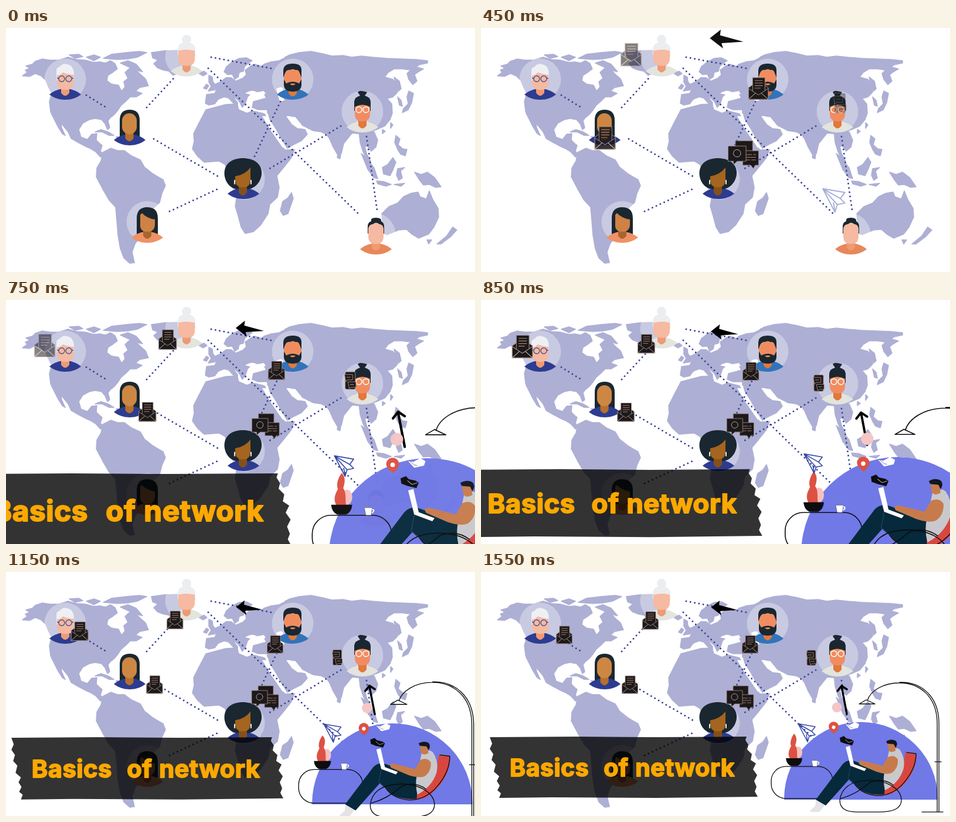
An HTML page that plays this animation: 800 by 418 pixels, repeating every 4600 ms.

```html
<!DOCTYPE html>
<html lang="en">
<head>
<meta charset="utf-8">
<title>Basics of network</title>
<style>
  html, body { margin: 0; width: 100%; height: 100%; overflow: hidden; background: #fff; }
  svg { display: block; width: 100vw; height: 100vh; }
  .land { fill: #adafd4; stroke: #adafd4; stroke-width: 1.5; stroke-linejoin: round; }
  .sea { fill: #fff; }
  .dots { fill: none; stroke: #3a4296; stroke-width: 3; stroke-linecap: round; stroke-dasharray: 0 7.4; }
  .glow { fill: #fff; opacity: .33; }
  .hair { fill: #1a2730; }
  .line { fill: none; stroke: #0b0b0b; stroke-width: 1.3; stroke-linecap: round; stroke-linejoin: round; }
  .card { fill: #1d191a; stroke: #a58f86; stroke-width: .8; stroke-linejoin: round; }
  .trim { fill: none; stroke: #cfc0b9; stroke-width: .8; stroke-linejoin: round; }
  .note { fill: none; stroke: #a98672; stroke-width: .9; }
  .title { font: 700 41px Inter, "Open Sans", sans-serif; letter-spacing: .5px; fill: #fca800; stroke: #fca800; stroke-width: 1.8; stroke-linejoin: round; }
  [data-start] { opacity: 0; }
</style>
</head>
<body>
<svg viewBox="0 0 800 418" preserveAspectRatio="none">
  <defs>
    <path id="bust" d="M-27 1C-19-6-10-9 0-9S19-6 27 1C19 7 10 10 0 10S-19 7-27 1Z"/>
    <path id="neck" d="M-7-16H7V-3Q0 7-7-3Z"/>
    <circle id="glow" class="glow" r="35.5"/>
    <g id="mail">
      <path class="card" d="M-13.500-1L-8-5H8L13.500-1V15H-13.500Z"/>
      <path class="card" d="M-8-15H9V6L0 10-8 5Z"/>
      <path class="note" d="M-5-11H6M-5-7.5H6M-5-4H6M-5-.5H3"/>
      <path class="card" d="M-13.500 0L0 9 13.500 0V15H-13.500Z"/>
      <path class="trim" d="M-13.500 15L-4 6.500M13.500 15L4 6.500"/>
    </g>
  </defs>

  <g class="land">
    <!-- North and Central America -->
    <path d="M28 82L36 76 33 72 41 69 34 65 45 62 50 57 62 53 75 55 90 55 106 50 120 54 135 55 150 59 160 58 170 60 178 56 186 61 190 70 182 76 174 81 172 90 180 96 192 98 197 108 203 101 201 92 208 86 203 76 212 68 222 72 230 80 238 87 243 99 228 102 221 108 232 112 222 118 212 118 204 126 196 133 190 142 184 149 179 153 160 152 130 158 84 158 76 143 74 126 78 112 72 100 68 90 60 82 50 78 40 83Z"/>
    <path d="M77 146L179 152 174 159 177 171 173 174 169 164 163 157 152 155 142 157 131 163 124 174 128 187 139 191 146 182 155 181 154 192 160 198 164 201 161 211 168 218 161 221 153 212 145 207 136 203 123 196 111 189 106 178 98 168 94 163 95 171 101 184 96 181 88 168Z"/>
    <path d="M108 46L124 45 131 49 118 52ZM137 50L150 46 161 50 150 56ZM166 52L180 45 205 42 228 40 240 42 224 50 208 53 190 54ZM195 60L208 56 222 62 233 75 220 72 208 66ZM152 178L162 174 174 178 184 184 176 184 164 178ZM188 186L200 188 192 191Z"/>
    <path d="M248 42L270 39 300 38 318 39 322 47 318 60 312 70 300 74 285 81 278 74 268 72 258 68 252 61 259 55 250 51Z"/>
    <!-- South America -->
    <path d="M165 213L179 206 190 210 202 210 214 219 229 226 236 238 251 250 268 260 272 270 266 283 262 299 250 310 246 324 236 341 228 349 227 360 220 370 215 384 219 402 211 403 201 394 195 378 191 355 189 330 187 307 176 295 165 276 154 255 155 240 162 228Z"/>
    <!-- Africa -->
    <path d="M341 140L356 136 375 131 394 130 397 140 411 146 421 142 441 147 449 162 459 185 470 202 476 209 492 208 487 222 472 241 462 253 466 273 463 290 450 302 447 318 434 338 422 349 408 352 401 341 396 322 391 305 394 287 386 273 377 263 378 248 374 234 364 228 350 229 338 230 327 220 318 207 321 194 320 181 329 163Z"/>
    <path d="M487 282L490 292 481 318 473 321 468 313 472 297 481 291Z"/>
    <!-- Europe -->
    <path d="M372 75L376 66 386 58 398 52 410 51 420 56 414 60 407 66 405 74 398 76 396 84 390 88 386 79 378 80Z"/>
    <path d="M340 129L342 114 356 112 360 104 354 98 366 92 375 85 384 85 392 91 404 86 410 80 408 72 416 66 424 62 434 65 428 72 440 62 452 58 466 56 478 50 500 44 500 130 446 140 430 140 420 136 422 126 430 124 444 120 440 112 428 114 420 110 412 118 408 130 403 136 398 126 392 120 386 116 395 128 395 133 387 128 380 120 372 118 362 122 356 130 346 132Z"/>
    <path d="M346 81L352 84 353 92 360 101 357 106 345 108 350 100 346 93ZM342 96L346 99 342 105 337 103ZM328 77L338 74 343 78 336 82Z"/>
    <!-- Asia -->
    <path d="M470 56L472 59 476 50 484 46 500 42 520 40 540 44 556 48 575 47 590 50 606 48 625 50 650 52 675 53 700 54 719 56 719 60 705 63 700 67 712 70 702 76 697 80 701 91 694 97 687 88 684 78 690 72 676 70 662 70 652 76 646 84 660 88 668 98 668 110 660 118 650 121 658 130 659 146 655 157 646 168 632 174 610 182 592 180 550 184 538 178 524 176 506 167 494 152 446 146 446 110Z"/>
    <path d="M602 176L628 178 634 192 631 204 623 211 617 203 612 202 615 215 622 228 616 226 609 212 604 196ZM544 178L592 178 584 188 576 198 572 215 566 218 558 204 552 190ZM566 215L571 216 570 224 565 222Z"/>
    <path d="M446 141L478 146 486 160 498 172 510 174 514 182 504 193 488 201 480 206 470 190 460 172 450 156Z"/>
    <path d="M662 84L671 91 674 104 670 108 665 96ZM687 108L695 112 692 128 686 140 676 145 678 138 686 130 684 118ZM668 118L674 124 676 134 671 132ZM656 162L660 166 656 172ZM642 174L647 177 642 181Z"/>
    <!-- Southern islands -->
    <path d="M606 215L615 222 628 240 634 258 627 256 617 242ZM632 262L644 263 657 268 648 271 634 267ZM660 222L665 230 660 243 655 253 644 250 642 239 651 234ZM668 241L680 239 673 245 676 257 670 261 666 252ZM665 184L672 190 669 200 677 207 684 208 681 219 673 216 668 208 663 196ZM697 247L708 251 719 247 731 256 742 272 733 273 722 268 712 269 705 260ZM662 268L680 266 674 271Z"/>
    <path d="M641 318L653 306 668 300 678 289 691 283 703 281 706 289 717 293 722 279 728 294 737 309 738 324 730 341 721 353 704 360 692 353 683 345 670 346 650 354 637 349 642 335ZM718 363L726 363 721 370ZM762 341L769 346 758 358 742 370 735 370 752 356Z"/>
  </g>
  <g class="sea">
    <path d="M408 112Q420 104 428 110L440 108 443 113 426 116ZM461 104Q470 99 473 104L470 111 475 124 467 126 464 116ZM437 151L444 151 456 172 476 204 472 205 452 176ZM478 151L484 151 498 164 511 172 498 172 488 165Z"/>
  </g>

  <g class="dots">
    <path d="M137 115L174 138M240 136L287 85M350 50L452 69M345 69L600 317M468 126L424 220M571 168L446 243M615 186L633 312M252 190L363 255M279 314L365 274"/>
  </g>

  <!-- People -->
  <g>
    <use href="#glow" x="101" y="88"/>
    <use href="#bust" x="101" y="113" fill="#2d3b90"/>
    <use href="#neck" x="101" y="114" fill="#ee9b74"/>
    <path fill="#eff0f4" d="M86 90V76Q85 68 92 66Q96 60 104 62Q113 64 114 70Q117 74 115 90Z"/>
    <path fill="#f6b9a1" d="M87 81Q93 81 97 76Q107 80 115 80V93Q115 106 101 106T87 93Z"/>
    <path fill="none" stroke="#3c518f" stroke-width="1.3" d="M90 87a5 5 0 1 0 10 0a5 5 0 1 0-10 0M102 87a5 5 0 1 0 10 0a5 5 0 1 0-10 0M87 86h3M112 86h3"/>
  </g>
  <g>
    <path class="hair" d="M194 187V158Q194 140 211 140T228 158V187Z"/>
    <use href="#bust" x="211" y="191" fill="#2d3b90"/>
    <use href="#neck" x="210.500" y="192" fill="#b4702d"/>
    <rect x="198" y="146" width="25" height="36" rx="12.500" fill="#cd8744"/>
  </g>
  <g>
    <use href="#glow" x="307" y="49"/>
    <use href="#bust" x="308" y="73" fill="#e3e4de"/>
    <use href="#neck" x="308" y="74" fill="#ee9b74"/>
    <path fill="#ecedf0" d="M293 46V36Q294 27 302 25A8 8 0 1 1 314 25Q323 28 323 37V46Z"/>
    <path fill="#f6b9a1" d="M294 39Q308 35 322 39V53Q322 65 308 65T294 53Z"/>
  </g>
  <g>
    <use href="#glow" x="489" y="88"/>
    <use href="#bust" x="489" y="113" fill="#3273ba"/>
    <use href="#neck" x="489" y="115" fill="#e2783c"/>
    <rect x="474" y="66" width="30" height="38" rx="11" fill="#f08d60"/>
    <path class="hair" d="M473 85V72Q474 61 489 61T504 72V85L501 77Q499 71 494 72Q489 69 484 72Q479 71 476 77Z"/>
    <path class="hair" d="M474 88L478 95Q489 89 500 95L504 88V98Q503 109 489 109T474 98Z"/>
    <path fill="#f08d60" d="M484 96Q489 94 494 96Q489 100 484 96Z"/>
  </g>
  <g>
    <use href="#glow" x="608" y="143"/>
    <use href="#bust" x="608" y="169" fill="#e3e4de"/>
    <use href="#neck" x="608" y="170" fill="#e2783c"/>
    <path class="hair" d="M594 142V126Q595 118 604 116L600 110Q602 107 608 108T616 110L612 116Q621 118 622 126V142Z"/>
    <path fill="#f08d60" d="M595 135Q608 128 621 135V147Q621 160 608 160T595 147Z"/>
    <path fill="none" stroke="#fff" stroke-width="1.4" d="M597 140a5 5 0 1 0 10 0a5 5 0 1 0-10 0M609 140a5 5 0 1 0 10 0a5 5 0 1 0-10 0"/>
  </g>
  <g>
    <use href="#glow" x="406" y="259"/>
    <use href="#bust" x="405" y="283" fill="#2d3b90"/>
    <path class="hair" d="M372.500 250C372 232 386 223 404 223S437 232 436 250C435 264 424 275 414 276H393C383 275 373 264 372.500 250Z"/>
    <use href="#neck" x="404" y="285" fill="#85501a"/>
    <path fill="#a3651f" d="M391 254Q407 252 417 239V260Q417 273 404 273T391 260Z"/>
    <path stroke="#fff" stroke-width="1.8" stroke-linecap="round" d="M390 261V267M418 261V267"/>
  </g>
  <g>
    <use href="#glow" x="241" y="332"/>
    <path class="hair" d="M223 354V326Q223 307 241 307T259 326V354Z"/>
    <use href="#bust" x="241" y="358" fill="#ef9265"/>
    <use href="#neck" x="241" y="359" fill="#a9652f"/>
    <path fill="#cf8245" d="M229 320L232 317Q240 326 254 328V336Q254 349 241 349T229 336Z"/>
  </g>
  <g>
    <use href="#glow" x="629" y="353"/>
    <use href="#bust" x="631" y="378" fill="#e8875a"/>
    <use href="#neck" x="631" y="379" fill="#ee9b74"/>
    <path class="hair" d="M617 352V340Q617 333 623 331Q621 325 631 325Q641 325 640 331Q645 334 645 340V352Z"/>
    <path fill="#f6b9a1" d="M618 343Q620 336 626 336Q631 331 637 336Q643 337 644 343V357Q644 370 631 370T618 357Z"/>
  </g>

  <!-- Arriving pieces -->
  <g data-start="80">
    <path class="card" d="M430 195H456V216H430Z"/>
    <path class="card" d="M441 210H465V232H460L457 237 453 232H441Z"/>
    <path class="note" d="M446 216H455M457 216H461M446 220H461M446 224H452M454 224H461"/>
    <path class="card" d="M419 203H446V226H433L427 231V226H419Z"/>
    <circle class="trim" cx="432.500" cy="214" r="5.500"/>
  </g>
  <g data-start="190"><use href="#mail" x="459" y="124"/></g>
  <g data-start="310">
    <path d="M392.500 60.500L407 49 406 56.500 437 65 408 67 410 74Z"/>
  </g>
  <g data-start="318"><use href="#mail" x="254" y="193"/></g>
  <g data-start="367"><use href="#mail" x="289" y="83"/></g>
  <g data-start="670"><use href="#mail" x="142.500" y="108"/></g>
  <g data-start="395">
    <rect class="card" x="556" y="134" width="15" height="26" rx="2"/>
    <path class="card" d="M555 138H567V146H559L557 149ZM560 149H572V157H565L562 159Z"/>
    <path class="note" d="M558 142H564M563 153H569"/>
  </g>
  <g data-start="450">
    <path fill="#000" fill-opacity=".8" d="M15 283L160 282 300 283 453 282 451 288 456 296 454 304 462 312 460 322 469 328 464 338 471 348 466 358 470 368 467 376 472 385 300 387 120 386 31 387 34 379 28 374 32 366 27 358 31 350 22 342 25 330 18 322 21 312 15 303 19 294Z"/>
    <text class="title" x="49" y="350">Basics<tspan x="199"> of</tspan><tspan x="253"> network</tspan></text>
  </g>
  <g data-start="505">
    <path fill="none" stroke="#000" stroke-width="3.400" stroke-linecap="round" stroke-linejoin="round" d="M624 243L615 196M608 204L615 195 624 201"/>
  </g>

  <g data-start="605">
    <path fill="#7079e6" d="M517 390V388A131 131 0 0 1 779 388V390Z"/>
    <circle cx="607" cy="232" r="8.500" fill="#f5c6c6"/>
    <rect class="line" x="495" y="333" width="105" height="55" rx="25"/>
    <!-- Things on the table -->
    <ellipse cx="541" cy="309" rx="7" ry="10" fill="#f6c0bd"/>
    <path fill="#dd5142" d="M527 320C522 311 526 304 529 298C526 292 530 282 534 277C540 283 538 291 536 297C541 304 538 312 540 320Z"/>
    <path fill="#0d0d0f" d="M520 319H548Q547 329 540 332H528Q521 329 520 319Z"/>
    <path fill="none" stroke="#fff" stroke-width="1.600" d="M574 325Q579 326 574 330"/>
    <path fill="#fff" stroke="#555" stroke-width=".5" d="M564 323H574.500L573 333H566Z"/>
    <path fill="none" stroke="#888" stroke-width=".8" d="M568 320Q566 317 568 314"/>
    <!-- Messages -->
    <path fill="#dd5142" d="M602 277Q593 270 593 265A8.500 8.500 0 0 1 610 265Q610 270 602 277Z"/>
    <circle cx="601.500" cy="266" r="3" fill="#fff"/>
    <path fill="#fff" d="M622 261L629 262 638 257 645 261 643 267 630 270Z"/>
    <path fill="none" stroke="#777" stroke-width=".7" d="M623 260L630 266 634 267"/>
    <path fill="#0d0d0f" d="M612 284L619 281 623 285 632 287 636 290 633 297 621 294 613 291Z"/>
    <path fill="none" stroke="#bbb" stroke-width=".8" d="M621 287L627 292 634 290"/>
    <!-- Chair -->
    <path fill="#d8473f" d="M724 309L742 311Q744 327 734 346Q722 368 700 380Q674 386 650 376Q638 369 634 358L690 366 718 344Z"/>
    <path class="line" d="M726 309L742 311Q742 336 722 360Q702 384 674 383Q645 380 634 358"/>
    <!-- Reader -->
    <path fill="#e5e2e8" d="M572 389L588 397 582 405 577 411 561 411Q562 407 570 401Z"/>
    <path fill="#06293b" d="M690 344L640 325Q626 319 617 329L571 390 588 400 628 355 648 374Q664 383 688 381Z"/>
    <path fill="none" stroke="#24455c" d="M630 333L626 354 634 361"/>
    <path fill="#c9c9cd" d="M696 306Q706 298 714 304Q725 321 720 339Q712 362 689 374Q685 357 688 343Z"/>
    <path fill="#c77b4c" d="M694 317Q705 312 711 321Q712 336 701 344Q692 348 674 342L646 330Q642 325 648 323L662 326 685 332Z"/>
    <path fill="#c77b4c" d="M693 292H706L707 306Q699 311 695 305Z"/>
    <path fill="#101720" d="M691 290Q699 285 707 289Q712 294 707 301L704 295 693 294Z"/>
    <path fill="#fff" d="M622 300L629 298 636 329 657 337 654 341 630 332Z"/>
    <path class="line" d="M612 391C614 371 630 358 657 357C690 355 716 370 717 390C717 405 704 411 678 411H640C620 411 612 404 612 391ZM614 388Q640 381 664 360Q686 352 703 365"/>
    <!-- Lamp -->
    <path class="line" d="M778 411V260C778 213 748 190 714 190C685 190 664 204 659 220M781 411V260C781 212 750 188 714 189M752 411H788M774 325H785"/>
    <path class="line" d="M657 219L645 226H672Z"/>
  </g>
  <g data-start="385" fill="none" stroke="#3347a6" stroke-width="1.500" stroke-linejoin="round">
    <path d="M541 260L570 265 564 273 570 279 560 281 557 291ZM541 260L564 273M541 260L560 281M557 291L555 278"/>
  </g>
</svg>
<script>
  const LOOP = 4600, STEP = 50, MOVE = 1000, FADE = 150, ZOOM = 0.3;
  const parts = [...document.querySelectorAll('[data-start]')]
    .map(el => ({ el, start: +el.dataset.start }));

  const clamp = v => Math.min(1, Math.max(0, v));

  // cubic-bezier(.5, 0, .1, 1)
  function ease(x) {
    let lo = 0, hi = 1;
    for (let i = 0; i < 24; i++) {
      const u = (lo + hi) / 2, v = 1 - u;
      if (1.5 * u * v * v + 0.3 * u * u * v + u * u * u < x) lo = u; else hi = u;
    }
    return lo * lo * (3 - 2 * lo);
  }

  // Every piece shrinks toward the middle of the stage while fading in.
  function draw() {
    const t = Math.floor(performance.now() % LOOP / STEP) * STEP;
    for (const { el, start } of parts) {
      const age = t - start;
      const s = 1 + ZOOM * (1 - ease(clamp(age / MOVE)));
      el.style.opacity = clamp(age / FADE);
      el.setAttribute('transform', `translate(400 209) scale(${s}) translate(-400 -209)`);
    }
    requestAnimationFrame(draw);
  }
  draw();
</script>
</body>
</html>
```
